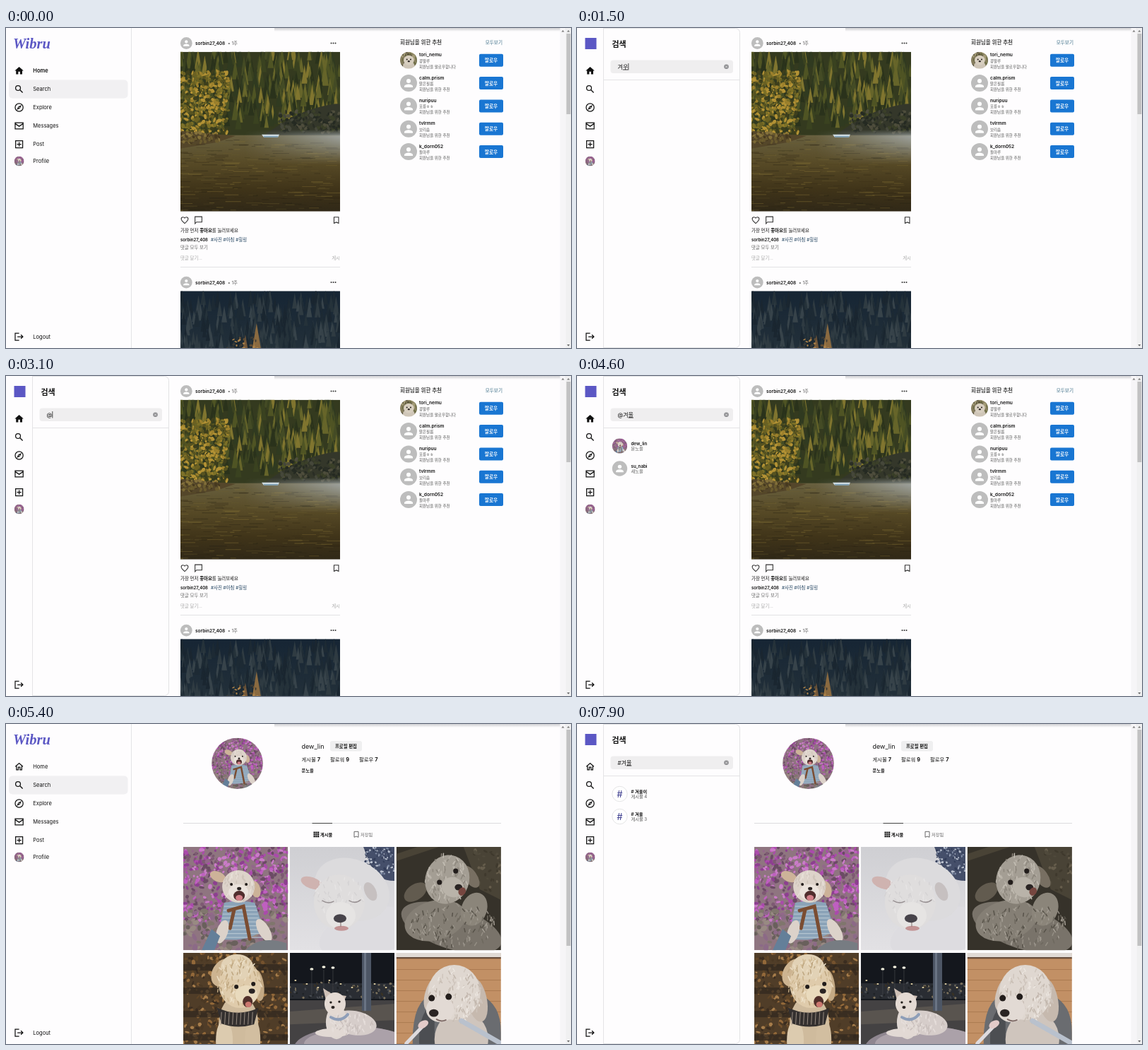
An HTML page for the animation above (8 s loop, 800 by 453 pixels).

```html
<!DOCTYPE html>
<html lang="ko">
<head>
<meta charset="utf-8">
<style>
html, body { margin: 0; width: 100%; height: 100%; overflow: hidden; background: #fefdfe; }
svg { display: block; }
text { font-family: Inter, 'Noto Sans CJK KR', 'Noto Sans CJK', sans-serif; white-space: pre; }
.line { fill: none; stroke: currentColor; stroke-width: 2; }
</style>
</head>
<body>
<svg id="stage" width="800" height="453" viewBox="0 0 800 453"></svg>
<script>
const LOOP = 8000;
const PURPLE = '#5b57c4';

let seed = 7;
const rnd = (a = 0, b = 1) => {
  seed = (seed * 16807) % 2147483647;
  return +(a + (b - a) * seed / 2147483647).toFixed(1);
};
const pick = list => list[Math.floor(rnd(0, 999)) % list.length];
const many = (n, fn) => Array.from({ length: n }, (_, i) => fn(i)).join('');

// ---- drawing helpers ----
const rect = (x, y, w, h, fill, r = 0, more = '') =>
  `<rect x="${x}" y="${y}" width="${w}" height="${h}" rx="${r}" fill="${fill}" ${more}/>`;
const oval = (x, y, rx, ry, fill, turn = 0, more = '') =>
  `<ellipse cx="${x}" cy="${y}" rx="${rx}" ry="${ry}" fill="${fill}" transform="rotate(${turn} ${x} ${y})" ${more}/>`;
const path = (d, fill, more = '') => `<path d="${d}" fill="${fill}" ${more}/>`;
const stroke = (d, color, w) => path(d, 'none', `stroke="${color}" stroke-width="${w}" stroke-linecap="round"`);
const text = (x, y, s, size, weight = 400, fill = '#111', anchor = 'start') =>
  `<text x="${x}" y="${y}" font-size="${size}" font-weight="${weight}" fill="${fill}" text-anchor="${anchor}">${s}</text>`;
const group = (id, body) => `<g id="${id}">${body}</g>`;
const fade = (id, stops, across = false) =>
  `<linearGradient id="${id}" x2="${across ? 1 : 0}" y2="${across ? 0 : 1}">` +
  stops.map(([at, color, alpha = 1]) => `<stop offset="${at}" stop-color="${color}" stop-opacity="${alpha}"/>`).join('') +
  '</linearGradient>';
const scatter = (n, x, y, w, h, size, colors) => many(n, () =>
  oval(rnd(x, x + w), rnd(y, y + h), rnd(size * .5, size * 1.4), rnd(size * .4, size), pick(colors), rnd(0, 180)));

const ICONS = {
  home: '<path d="M10 20v-6h4v6h5v-8h3L12 3 2 12h3v8z"/>',
  homeLine: '<path class="line" d="M3.5 11.5 12 4l8.500 7.500M6 10v9h4v-6h4v6h4v-9"/>',
  search: '<circle class="line" cx="9.500" cy="9.500" r="5.500"/><path class="line" d="M14 14l6 6"/>',
  explore: '<circle class="line" cx="12" cy="12" r="9"/><path d="M6.500 17.500l7.500-3.500 3.500-7.500-7.500 3.500z"/><circle cx="12" cy="12" r="1.200" fill="#fff"/>',
  mail: '<path class="line" d="M3 5h18v14H3zM3 7l9 6 9-6"/>',
  post: '<path class="line" d="M4 4h16v16H4zM12 7v10M7 12h10"/>',
  logout: '<path class="line" d="M12 4H3v16h9M8 12h12M16 7.500l4.500 4.500-4.500 4.500"/>',
  heart: '<path class="line" d="M12 20.500C6 15.500 3 12.500 3 8.800 3 6 5 4 7.500 4c1.800 0 3.500 1 4.500 2.600C13 5 14.700 4 16.500 4 19 4 21 6 21 8.800c0 3.700-3 6.700-9 11.700z"/>',
  comment: '<path class="line" d="M3 3h18v14H7l-4 4z"/>',
  bookmark: '<path class="line" d="M6 4h12v16l-6-2.600L6 20z"/>',
  close: '<path class="line" d="M5 5l14 14M19 5L5 19"/>',
  person: '<circle cx="12" cy="8" r="4"/><path d="M12 14c-2.700 0-8 1.300-8 4v2h16v-2c0-2.700-5.300-4-8-4z"/>'
};
const icon = (name, x, y, size, color = '#111') =>
  `<g transform="translate(${x - size / 2} ${y - size / 2}) scale(${size / 24})" fill="${color}" color="${color}">${ICONS[name]}</g>`;
const blankFace = (x, y, r) => oval(x, y, r, r, '#bdbdbd') + icon('person', x, y, r * 1.5, '#fff');
const disc = (id, x, y, r) =>
  `<g transform="translate(${x} ${y}) scale(${r / 73})" clip-path="url(#disc)"><use href="#${id}" x="-74" y="-73" width="148" height="146"/></g>`;

// ---- photographs ----
const photo = (id, w, h, body) => `<symbol id="${id}" viewBox="0 0 ${w} ${h}"><g filter="url(#soft)">${body}</g></symbol>`;
const firs = (n, x, y, w, h, tall, colors) => many(n, i => {
  const cx = rnd(x, x + w), foot = y + h * i / n, up = rnd(tall * .7, tall * 1.2), half = up * .17;
  return path(`M${cx} ${foot - up}l${half} ${up}h${-2 * half}z`, pick(colors));
});
const fur = (n, x, y, rx, ry, colors) => many(n, () => {
  const a = rnd(0, 6.3), d = Math.sqrt(rnd());
  const px = (x + Math.cos(a) * d * rx).toFixed(1), py = (y + Math.sin(a) * d * ry).toFixed(1);
  return stroke(`M${px} ${py}l${rnd(-3, 3)} ${rnd(2, 6)}`, pick(colors), 1.5);
});
const eyes = (x1, y1, x2, y2, r, nx, ny) =>
  oval(x1, y1, r, r, '#221d1b') + oval(x2, y2, r, r, '#221d1b') + oval(nx, ny, r * 1.5, r * 1.2, '#2a2423');

function lake() {
  return rect(0, 0, 226, 122, '#343a1f') +
    firs(330, 0, 10, 226, 102, 25, ['#4f5424', '#66652a', '#3a4220', '#2a321b', '#80752f', '#444b25', '#303a20']) +
    path('M120 117Q160 88 190 80T226 74V120H120z', '#34372a') +
    scatter(150, 140, 84, 86, 30, 2.6, ['#2a2e25', '#45473a', '#3b4029', '#4e4d3c', '#252a22']) +
    scatter(480, -4, 28, 72, 88, 2.8, ['#9c802c', '#7c7027', '#b39235', '#565220', '#6b6122', '#3d3e1c']) +
    rect(0, 118, 226, 108, 'url(#water)') +
    path('M0 112Q40 116 78 119L52 128 0 137z', '#54462a') +
    scatter(60, 0, 114, 55, 14, 2.5, ['#83703a', '#46391f', '#695a2e']) +
    many(260, () => rect(rnd(-20, 215), rnd(124, 225), rnd(5, 26), rnd(.5, 1.5), pick(['#8d7938', '#2b2313', '#6b5c30', '#241d12']), 0, 'opacity=".35"')) +
    rect(90, 110, 136, 50, 'url(#mist)', 0, 'mask="url(#mistMask)"') +
    path('M115 117h25l-2 4h-20z', '#cddbe2') + rect(118, 119.5, 20, 1.5, '#6d91a8');
}
function pines() {
  return rect(0, 0, 226, 226, 'url(#dusk)') +
    firs(300, 0, 18, 226, 90, 22, ['#1d2a34', '#25323a', '#2f3b42', '#1a2630', '#37434a']) +
    firs(5, 68, 88, 40, 26, 38, ['#8a6a40', '#75593a', '#9c7643']) +
    scatter(40, 66, 66, 44, 30, 2, ['#a98049', '#5f4c35', '#3a3a36']);
}
function bloom() {
  return rect(0, 0, 148, 146, '#8f7580') +
    scatter(620, 0, 0, 148, 104, 3, ['#aa4bab', '#bf60c0', '#8d3f90', '#ca7bc8', '#6b4b64', '#93678a', '#7d5a72']) +
    scatter(150, 0, 90, 148, 56, 4, ['#80766d', '#988a82', '#69605c', '#8c6a87']) +
    oval(49, 42, 12, 7, '#cdb399', 25) + oval(102, 60, 7, 12, '#ccb298', -15) +
    path('M58 79Q78 74 101 79L114 116Q92 136 49 130z', '#8ba3b8') +
    many(9, i => stroke(`M${58 - i} ${84 + i * 5.5}h${45 + i * 2}`, '#b4c4d0', 1.2)) +
    stroke('M64 90L85 84 94 130M72 88L66 115', '#7b4d32', 5) +
    oval(78, 56, 23, 23, '#ddd3ca') + fur(50, 78, 54, 22, 20, ['#cfc4ba', '#e8e0d8']) + oval(78, 64, 14, 11, '#ebe3dc') +
    oval(79, 69, 8, 7, '#512e2d') + oval(79, 72, 5, 4, '#d37f88') + eyes(68, 53, 89, 53, 2, 79, 59) +
    oval(55, 120, 8, 17, '#dcd2ca', 18) + oval(114, 118, 8, 18, '#dcd2ca', -30) +
    path('M26 146l14-30 12 10-8 20z', '#647f99') + path('M88 146q20-22 58-10v10z', '#777c82');
}
function bed() {
  return rect(0, 0, 148, 146, 'url(#sheet)') +
    path('M104 0h44v48q-25 0-33-20z', '#454f6a') +
    scatter(110, 106, 0, 42, 40, 1.6, ['#b9c0ce', '#7d89a2', '#333d58']) +
    oval(110, 122, 70, 34, '#dddce0', -15) +
    oval(88, 60, 55, 42, '#dcdbdd', 25) + oval(31, 51, 16, 8, '#cfb3b0', 20) + oval(114, 63, 8, 14, '#c6c0c0', -25) +
    oval(70, 78, 36, 39, '#dfdddd') + fur(50, 70, 66, 34, 30, ['#d5d3d4', '#e6e4e4']) + oval(72, 97, 21, 19, '#e6e4e3') +
    stroke('M46 76q8 5 16 1M84 76q9 5 16-1', '#989193', 1.5) +
    oval(71, 101, 9, 6, '#47434a') + oval(73, 115, 10, 3.5, '#c39495') + stroke('M72 107v5', '#82716f', 1);
}
function sofa() {
  return rect(0, 0, 148, 146, '#36322a') + path('M0 20L60 0H30L0 10zM95 0h53v75L118 60z', '#494336') +
    scatter(40, 110, 4, 38, 60, 2.5, ['#665d4c', '#3f392d', '#504a3c']) +
    oval(78, 114, 74, 30, '#79736a', 18) + oval(55, 104, 44, 28, '#857f75', -15) + oval(110, 88, 18, 24, '#8b857a', 20) +
    fur(170, 80, 110, 62, 30, ['#958f85', '#6d685e', '#a39d93', '#575249']) +
    oval(27, 64, 18, 11, '#625b4f', -35) + oval(105, 42, 9, 18, '#786f62', -35) +
    oval(72, 46, 31, 35, '#a49e94', 20) + fur(110, 70, 42, 29, 33, ['#b5afa5', '#8b857b', '#c3bdb3']) +
    oval(80, 57, 16, 14, '#b9b3a9', 20) + eyes(61, 50, 84, 34, 3.6, 88, 57) + oval(93, 63, 5, 6, '#76463f', 30);
}
function autumn() {
  return rect(0, 0, 148, 146, '#503d28') + scatter(520, 0, 0, 148, 146, 2.8, ['#74522e', '#93693a', '#3b2d20', '#5f4527', '#a67c4a', '#4a3824']) +
    many(4, i => rect(0, 16 + i * 33, 148, 9, '#30271e', 0, 'opacity=".7"')) +
    oval(78, 101, 28, 42, '#cfbb9d') + oval(58, 124, 12, 30, '#dccbaf') + oval(98, 122, 11, 30, '#d2bea0') +
    path('M47 77Q76 92 106 78L100 101Q76 108 54 100z', '#34302f') +
    many(9, i => stroke(`M${54 + i * 5.500} 84l-1 17`, '#978b80', 1)) +
    oval(56, 28, 15, 21, '#cdb491', 30) + oval(106, 46, 8, 22, '#c4aa85', -8) +
    oval(80, 44, 30, 34, '#dfcbab') + oval(76, 20, 23, 18, '#e2d2b6') +
    fur(130, 78, 38, 32, 32, ['#cfb892', '#ecdfc6', '#bda57f']) +
    oval(89, 59, 16, 13, '#e9dabd') + oval(91, 69, 7, 8, '#51302b') + oval(92, 73, 4.5, 4, '#cb776f') + eyes(75, 48, 99, 44, 3, 97, 54);
}
function night() {
  return rect(0, 0, 148, 146, '#14171d') + rect(0, 43, 148, 22, '#2a2d33') +
    scatter(90, 0, 42, 148, 22, 1.8, ['#1f2225', '#474b50', '#393225', '#7a705c']) +
    rect(0, 67, 148, 79, '#444243') + path('M0 83L148 72V95L0 101z', '#59544f') +
    many(9, i => oval(8 + i * 16, 39 + i % 3 * 5, 1.5, 1, '#e5d5a8')) +
    [31, 48, 61].map(x => oval(x, 20 + x % 4, 2.500, 1.800, '#f5f3e1') + stroke(`M${x} 24v35`, '#45474a', .7)).join('') +
    rect(102, 0, 13, 82, '#4d5665') + rect(105, 0, 3, 82, '#6a7484') +
    oval(83, 130, 77, 26, '#8f8690', -3) + oval(90, 125, 70, 19, '#aba1a9', -3) +
    oval(91, 99, 32, 17, '#d6cdca', 10) + oval(66, 98, 15, 24, '#dfd7d2') + oval(60, 113, 24, 6, '#e2d9d4') +
    path('M47 50l14 9-8 16zM66 59l14 2-7 15z', '#cfc0b6') + oval(64, 72, 15, 16, '#e4dad3') +
    fur(60, 86, 98, 32, 15, ['#c8bebb', '#e6dedb']) +
    eyes(58, 70, 70, 69, 1.700, 61, 77) + stroke('M58 91Q72 99 82 87', '#8e9eb8', 4);
}
function floor() {
  return rect(0, 0, 148, 146, '#c29065') + many(9, i => rect(0, 8 + i * 15, 148, 1, '#ab7a51')) +
    rect(0, 0, 148, 7, '#e0dad5') + rect(0, 6, 148, 2, '#694e3d') +
    path('M24 146Q18 68 52 58L120 60Q148 73 148 112V146z', '#6a6c70') + path('M34 146Q26 86 54 70V146z', '#4c4e52') +
    oval(92, 122, 38, 40, '#cfc5bd') + oval(114, 66, 14, 32, '#c6b9ae', -12) + oval(52, 57, 11, 26, '#d0c4ba', 18) +
    oval(82, 56, 37, 39, '#dfd7d0') + fur(150, 84, 58, 36, 38, ['#cfc5bc', '#ece6e0', '#c2b7ad']) +
    oval(62, 80, 20, 18, '#e2dad4') + eyes(50, 64, 74, 62, 4.5, 53, 85) +
    stroke('M57 94q6 4 13 1', '#7e6a66', 2) +
    stroke('M14 128L40 101', '#dedbde', 5) + oval(38, 101, 8, 5, '#e3cbc9', -30) + stroke('M92 96L148 128', '#b9c1cd', 7);
}
function pup() {
  return rect(0, 0, 148, 146, '#867e5e') + scatter(60, 0, 0, 148, 146, 14, ['#6d6c45', '#a49c77', '#554f3b']) +
    oval(76, 125, 52, 42, '#cfc6b8') + oval(76, 72, 45, 42, '#d8cfc0') + eyes(60, 66, 92, 66, 6, 76, 82);
}

const defs = `<defs>
  <filter id="soft" x="0" y="0" width="1" height="1"><feGaussianBlur stdDeviation=".7"/></filter>
  <clipPath id="disc"><circle r="73"/></clipPath>
  <mask id="mistMask" maskContentUnits="objectBoundingBox"><rect width="1" height="1" fill="url(#mistFall)"/></mask>` +
  fade('mistFall', [[0, '#000'], [.2, '#fff'], [1, '#000']]) +
  fade('mist', [[0, '#a9b0b2', 0], [1, '#a9b0b2', .8]], true) +
  fade('water', [[0, '#68603f'], [.35, '#584b27'], [.7, '#403419'], [1, '#302817']]) +
  fade('dusk', [[0, '#162534'], [.4, '#24313a']]) +
  fade('sheet', [[0, '#cfcfd3'], [1, '#e2e1e4']]) +
  fade('shade', [[0, '#cfcfd2'], [1, '#fefdfe']]) +
  photo('lake', 226, 226, lake()) + photo('pines', 226, 226, pines()) +
  photo('pup', 148, 146, pup()) +
  Object.entries({ bloom, bed, sofa, autumn, night, floor }).map(([id, draw]) => photo(id, 148, 146, draw())).join('') +
  '</defs>';

// ---- pages ----
const AUTHOR = 'sorbin27_408';
const USER = 'dew_lin', NICK = '문노을';

const post = (y, id) => blankFace(255.3, y + 21.5, 8.4) + text(268, y + 24, AUTHOR, 6.5, 600) +
  text(314, y + 24, '• 1주', 6.4, 400, '#555') +
  [460.5, 463.5, 466.5].map(x => oval(x, y + 21.5, 1, 1, '#333')).join('') +
  `<use href="#${id}" x="247" y="${y + 33.7}" width="226" height="226"/>`;

const feed = () => post(0, 'lake') + post(338.6, 'pines') +
  icon('heart', 253, 272, 13, '#333') + icon('comment', 272.5, 272, 13, '#333') + icon('bookmark', 467.7, 272, 13, '#333') +
  text(247, 288.5, '가장 먼저 <tspan font-weight="700">좋아요</tspan>를 눌러보세요', 6.4) +
  text(247, 301.5, AUTHOR, 6, 600) + text(290, 301.5, '#사진 #아침 #힐링', 6.4, 400, '#1d3f5c') +
  text(247, 313, '댓글 모두 보기', 6.4, 400, '#666') + text(247, 328, '댓글 달기...', 6.4, 400, '#aaa') +
  text(473, 328, '게시', 6.4, 400, '#aaa', 'end') + rect(247, 338, 226, 1, '#e2e2e4') +
  text(558, 23.2, '회원님을 위한 추천', 7.5, 600, '#444') + text(703, 23, '모두보기', 6.6, 500, '#3f7089', 'end') +
  [['tori_nemu', '콩말루'], ['calm.prism', '맑은필름'], ['nuripuu', '포릉ㅎㅎ'], ['tvlrmm', '보리솜'], ['k_dorn052', '돌마루']]
    .map(([name, nick], i) => {
      const y = 45.7 + i * 32.35;
      return (i ? blankFace(570, y, 12) : disc('pup', 570, y, 12)) +
        text(585, y - 5.5, name, 6.6, 600) + text(585, y + 3, nick, 5.5, 400, '#555') +
        text(585, y + 11, i ? '회원님을 위한 추천' : '회원님을 팔로우합니다', 5.5, 400, '#555') +
        rect(670, y - 9, 34, 18, '#1976d2', 2) + text(687, y + 2.5, '팔로우', 6.7, 600, '#fff', 'middle');
    }).join('');

const stat = (x, label, n) => text(x, 53, `${label} <tspan font-weight="700">${n}</tspan>`, 7.3);
const profile = () => disc('bloom', 327.5, 55.7, 36.3) +
  text(418.5, 34.5, USER, 9) + rect(459, 24, 45, 14.5, '#efeff0', 3) + text(481.5, 33.6, '프로필 편집', 6.4, 600, '#111', 'middle') +
  stat(418.5, '게시물', 7) + stat(459, '팔로워', 9) + stat(500, '팔로우', 7) + text(418.5, 68.3, NICK, 6.2, 600) +
  rect(251, 140, 450, 1, '#dcdcde') + rect(433.5, 140, 28.5, 1, '#444') +
  many(9, i => rect(435.5 + i % 3 * 2.8, 152.5 + Math.floor(i / 3) * 2.8, 2.2, 2.2, '#111')) +
  text(445, 158.7, '게시물', 6.2, 600) + icon('bookmark', 496, 156.3, 12, '#666') + text(502, 158.7, '저장됨', 6.2, 400, '#666') +
  ['bloom', 'bed', 'sofa', 'autumn', 'night', 'floor'].map((id, i) =>
    `<use href="#${id}" x="${251 + i % 3 * 150.8}" y="${174 + Math.floor(i / 3) * 150}" width="148.300" height="146.200"/>`).join('');

const NAV = [['search', 'Search', 86.5], ['explore', 'Explore', 112.5], ['mail', 'Messages', 138.5], ['post', 'Post', 164.5], ['logout', 'Logout', 437]];
const label = (s, y, weight = 400) => text(38.3, y + 2.6, s, 7.5, weight);
const sidebar = () =>
  group('wide', rect(0, 0, 177, 453, '#fefdfe') + rect(177, 0, 1, 453, '#e4e4e6') +
    rect(4, 73.5, 168.5, 26, '#f1f0f2', 5, 'id="pill"') +
    `<text x="10" y="29" font-size="20.500" style="font-family:'Liberation Serif',serif;font-weight:700;font-style:italic" fill="${PURPLE}">Wibru</text>` +
    group('homeBold', label('Home', 60.5, 600)) + group('homeThin', label('Home', 60.5)) +
    NAV.map(([, s, y]) => label(s, y)).join('') + label('Profile', 188.5)) +
  group('slim', rect(0, 0, 37, 453, '#fefdfe') + rect(37, 0, 1, 453, '#e4e4e6') + rect(11.5, 14, 16, 16, PURPLE)) +
  group('homeFull', icon('home', 18.6, 60.5, 15)) + group('homeOutline', icon('homeLine', 18.6, 60.5, 15)) +
  NAV.map(([name, , y]) => icon(name, 18.6, y, 15)).join('') + disc('bloom', 18.6, 188.6, 7);

const caption = (y, top, sub) => text(76.500, y - 1.2, top, 6.2, 600) + text(76.5, y + 6.3, sub, 6.2, 400, '#555');
const tag = (y, name, n) => oval(60.5, y, 10.7, 10.7, '#fff', 0, 'stroke="#dededf" stroke-width=".8"') +
  text(60.5, y + 4.5, '#', 12.5, 500, '#4a4a96', 'middle') + caption(y, `# ${name}`, `게시물 ${n}`);
const panel = () => rect(30.5, .5, 200, 452, '#fefdfe', 6, 'stroke="#e2e2e4"') +
  text(49.500, 26.7, '검색', 11, 600) + rect(47.5, 45.5, 173.5, 18.5, '#efeeef', 4) + rect(38, 73, 192, 1, '#e4e4e6') +
  oval(211.5, 54.8, 3.3, 3.3, '#8c8c8f') + stroke('M210.300 53.600l2.400 2.400m0-2.400l-2.400 2.400', '#efeeef', .8) +
  text(57.5, 57.6, '검색', 8, 400, '#777').replace('<text', '<text id="hint"') +
  text(57.5, 57.6, '', 8).replace('<text', '<text id="query"') +
  rect(58, 50, .8, 9.5, '#222', 0, 'id="caret"') +
  group('recent', text(49.5, 90.8, '최근 검색 항목', 7.2, 700) + text(221, 90.8, '모두 지우기', 6.4, 500, '#2f7d95', 'end')) +
  group('none', text(134.5, 264.5, '최근 검색 내역 없음.', 6.4, 500, '#222', 'middle')) +
  group('visited', rect(46, 98, 177, 31, '#f9f9f9', 3) + disc('bloom', 60.5, 113.3, 10.7) + caption(113.3, USER, NICK) + icon('close', 210.3, 113, 9.5)) +
  group('users', disc('bloom', 60.5, 99, 10.7) + caption(99, USER, NICK) + blankFace(60.5, 131, 10.7) + caption(131, 'su_nabi', '새노을')) +
  group('tags', tag(99, '겨울이', 4) + tag(131, '겨울', 3));

const bars = () => rect(380, 0, 420, 5, 'url(#shade)') + rect(784.5, 0, 8, 453, '#f6f5f7') + rect(792.5, 0, 7.5, 453, '#f0f0f1') +
  rect(793.5, 8, 5.8, 114, '#c1c1c2', 0, 'id="thumb"') +
  [788.5, 796.3].map(x => path(`M${x - 2} 5.500h4l-2-2.500z`, '#777')).join('') + path('M794.300 448h4l-2 2.500z', '#666');

const $ = id => document.getElementById(id);
$('stage').innerHTML = defs + rect(0, 0, 800, 453, '#fefdfe') + group('feed', feed()) + group('profile', profile()) +
  group('panel', panel()) + sidebar() + bars();

// ---- timeline ----
const TYPED = [[0, ''], [1200, 'ㄱ'], [1300, '겨'], [1500, '겨우'], [1600, '겨울'], [2300, '겨우'], [2400, '겨'], [2600, ''],
  [3000, '@'], [3300, '@ㄱ'], [3400, '@겨'], [3600, '@겨우'], [3700, '@겨울'], [4900, ''],
  [7100, '#'], [7300, '#겨'], [7400, '#겨울']];
const OPEN = [[200, 4900], [5800, LOOP]];
const HOVER = [[0, 73.5], [4900, 126], [5400, 73.5]];
const SLIDE = 250;

const at = (steps, t) => steps.filter(([from]) => from <= t).pop();
const show = (id, on) => { $(id).style.display = on ? '' : 'none'; };

let last = '';
function draw(t) {
  const span = OPEN.find(([a, b]) => t >= a && t < b);
  const p = span ? Math.min(1, (t - span[0]) / SLIDE) : 0;
  const shift = -193 * (1 - p) ** 3;
  const [since, typed] = at(TYPED, t);
  const onProfile = t >= 4900;
  const pillY = at(HOVER, t)[1];
  const caretOn = p === 1 && Math.floor((t - since) / 500) % 2 === 0;
  const key = [!!span, shift, typed, onProfile, pillY, caretOn].join();
  if (key === last) return;
  last = key;

  show('feed', !onProfile);
  show('profile', onProfile);
  show('wide', !span);
  show('slim', span);
  show('panel', span);
  for (const id of ['homeBold', 'homeFull']) show(id, !onProfile);
  for (const id of ['homeThin', 'homeOutline']) show(id, onProfile);
  $('panel').setAttribute('transform', `translate(${shift} 0)`);
  $('pill').setAttribute('y', pillY);
  $('thumb').setAttribute('height', onProfile ? 306 : 114);

  show('hint', !typed);
  show('recent', !typed);
  show('none', !typed && !onProfile);
  show('visited', !typed && onProfile);
  show('users', /^@[가-힣]/.test(typed));
  show('tags', /^#[가-힣]/.test(typed));
  const head = typed.slice(0, -1), tail = typed.slice(-1);
  const composing = /[ㄱ-힣]/.test(tail);
  $('query').innerHTML = composing ? `${head}<tspan text-decoration="underline">${tail}</tspan>` : typed;
  const end = typed && span ? $('query').getComputedTextLength() : 0;
  $('caret').setAttribute('x', 57.7 + end);
  show('caret', caretOn);
}

const start = performance.now();
function tick() {
  draw((performance.now() - start) % LOOP);
  requestAnimationFrame(tick);
}
tick();
</script>
</body>
</html>
```
